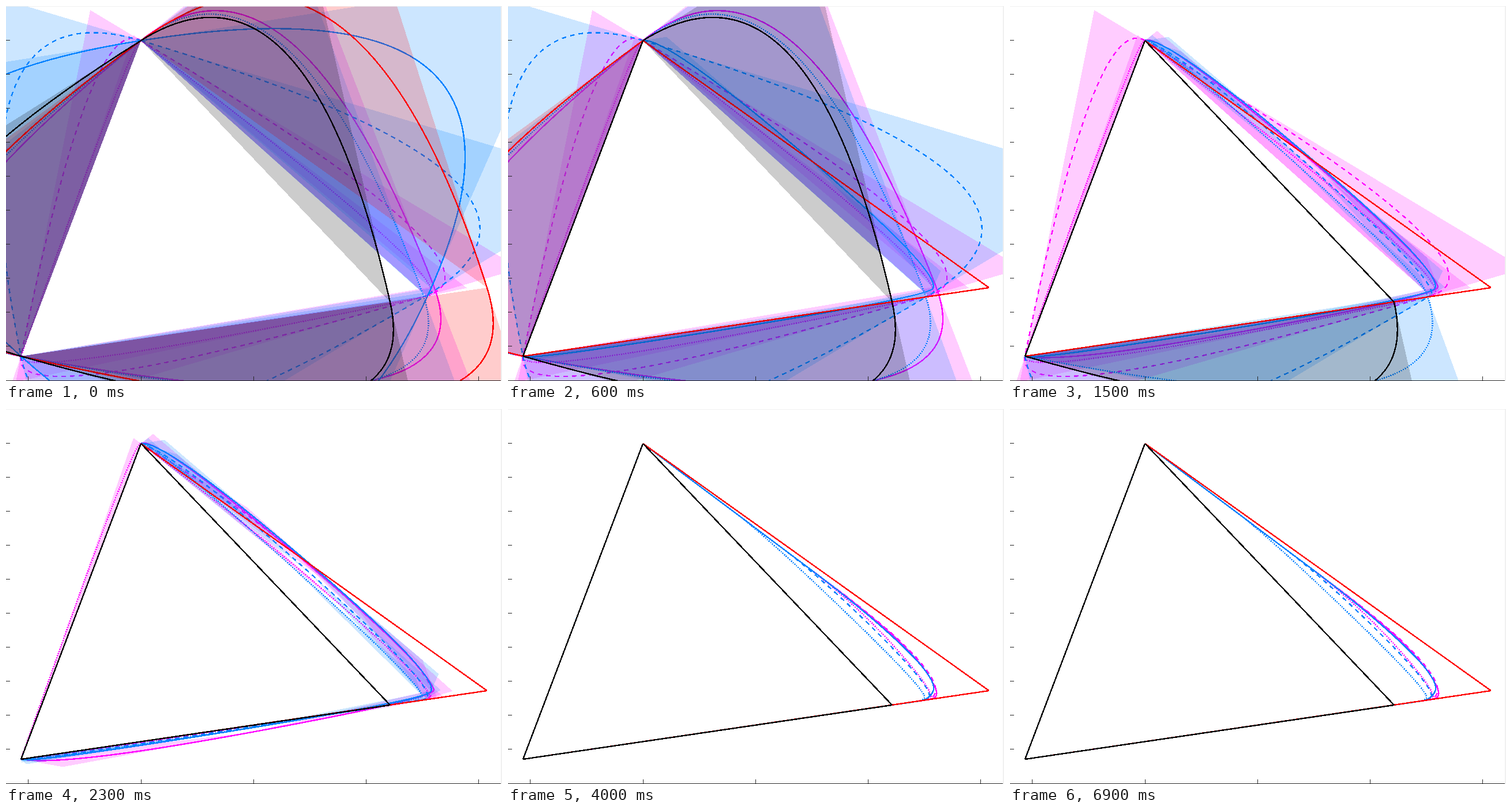
An HTML page for the animation above (7 s loop, 860 px wide and 651 px high).

```html
<!DOCTYPE html>
<html>
<head>
<meta charset="utf-8">
<style>
html, body { margin: 0; width: 100%; height: 100%; overflow: hidden; background: #f0f0f0; }
svg { display: block; }
path { shape-rendering: crispEdges; }
.line { fill: none; stroke-width: 2.4; stroke-linejoin: round; }
.axis { fill: none; stroke: #262626; }
</style>
</head>
<body>
<svg width="860" height="651">
  <clipPath id="plot"><rect y="1" width="858" height="650"/></clipPath>
  <rect y="1" width="858" height="650" fill="#fff"/>
  <g id="sides" clip-path="url(#plot)"></g>
  <path class="axis" d="M0 650.5H858"/>
</svg>
<script>
const svg = document.querySelector('svg'), group = document.getElementById('sides');
const A = [234, 60], B = [26, 608], innerC = [666, 514], outerC = [834, 489];
const magenta = '#f0f', blue = '#0080ff';
const solid = 'none', dashed = '8 7', dotted = '2 2';

// a, b, c: tangent slopes at A, B, C; cut and bend: how far sides AC and BC keep
// to their tangents after the first cut; leave: x where AC leaves the common ray
const curves = [
  { color: magenta, dash: solid, C: [742, 487], a: -.8, b: .185, c: 2.593, cut: .08, bend: .088, leave: 640 },
  { color: magenta, dash: dashed, C: [729, 503], a: .602, b: -5, c: -.29, cut: .28, bend: .02, leave: 680 },
  { color: magenta, dash: dotted, C: [730, 504], a: .76, b: -2.86, c: -.208, cut: .39, bend: .04, leave: 605 },
  { color: blue, dash: solid, C: [737, 490], a: -.158, b: .9, c: -2.27, cut: .055, bend: .02, leave: 620 },
  { color: blue, dash: dashed, C: [728.5, 503], a: .3, b: 5, c: -.6, cut: .077, bend: .02, leave: 550 },
  { color: blue, dash: dotted, C: [722, 498], a: -.76, b: .195, c: 2.735, cut: .05, bend: .03, leave: 450 },
  { color: '#f00', dash: solid, C: outerC, a: -.73, b: .23, c: 3.135 },
  { color: '#000', dash: solid, C: innerC, a: -.628, b: .287, c: 4.425 }
];

const mix = (p, q, k) => [p[0] + (q[0] - p[0]) * k, p[1] + (q[1] - p[1]) * k];
const slope = (p, q) => (q[1] - p[1]) / (q[0] - p[0]);
const onRay = x => [x, A[1] + .752 * (x - A[0])];

function meet(p, m, q, n) {
  const x = (q[1] - p[1] + m * p[0] - n * q[0]) / (m - n);
  return [x, p[1] + m * (x - p[0])];
}

function area(points) {
  const cross = points.reduce((sum, p, i) => {
    const q = points[(i + 1) % points.length];
    return sum + p[0] * q[1] - q[0] * p[1];
  }, 0);
  return Math.abs(cross) / 2;
}

// The successive control polygons of the sides AB, BC and AC
function makeShapes({ C, a, b, c, cut, bend, leave }) {
  const left = meet(A, a, B, b), low = meet(B, b, C, c), top = meet(A, a, C, c);
  const ab = [[A, left, B], [A, B]];
  if (!cut) return [ab, [[B, low, C], [B, C]], [[A, top, C], [A, C]]];

  const base = slope(innerC, outerC), knee = meet(C, c, innerC, base);
  const turn = onRay(leave);
  return [
    ab,
    [[B, low, C],
     [B, mix(B, low, bend), knee, C],
     [B, [knee[0] - 36, knee[1] - 36 * base], knee, C]],
    [[A, top, C],
     [A, mix(A, top, cut), mix(C, top, cut), C],
     [A, mix(A, turn, .5), turn, mix(C, top, cut * .65), C]]
  ];
}

function addPath(attributes, parent) {
  const path = document.createElementNS('http://www.w3.org/2000/svg', 'path');
  for (const name in attributes) path.setAttribute(name, attributes[name]);
  return parent.appendChild(path);
}

// Chain of quadratic arcs joined at midpoints, with the control triangle of each
function trace(points) {
  const last = points.length - 1;
  let from = points[0], line = `M${from}`, hull = '';
  for (let i = 1; i < last; i++) {
    const to = i === last - 1 ? points[last] : mix(points[i], points[i + 1], .5);
    line += `Q${points[i]} ${to}`;
    hull += `M${from}L${points[i]}L${to}Z`;
    from = to;
  }
  if (last === 1) line += `L${points[1]}`;
  return { line, hull };
}

const sides = curves.flatMap(curve => makeShapes(curve).map(shapes => ({
  shapes,
  hull: addPath({ fill: curve.color, 'fill-opacity': .2 }, group),
  line: addPath({ class: 'line', stroke: curve.color, 'stroke-dasharray': curve.dash }, group)
})));

// In each round every side is cut once, the largest polygon first
const order = [0, 1].flatMap(round => sides
  .filter(side => side.shapes.length > round + 1)
  .sort((p, q) => area(q.shapes[round]) - area(p.shapes[round])));

for (let i = 0; i < 10; i++) addPath({ class: 'axis', d: `M0 ${Math.round(59.4 + i * 59) + .5}h7` }, svg);
for (let i = 0; i < 5; i++) addPath({ class: 'axis', d: `M${Math.round(38.4 + i * 195.1) + .5} 643v7` }, svg);

function draw() {
  const done = order.slice(0, Math.floor(performance.now() % 7000 / 100));
  for (const side of sides) {
    const stage = done.filter(cutSide => cutSide === side).length;
    const { line, hull } = trace(side.shapes[stage]);
    side.line.setAttribute('d', line);
    side.hull.setAttribute('d', stage < side.shapes.length - 1 ? hull : '');
  }
  requestAnimationFrame(draw);
}
draw();
</script>
</body>
</html>
```
